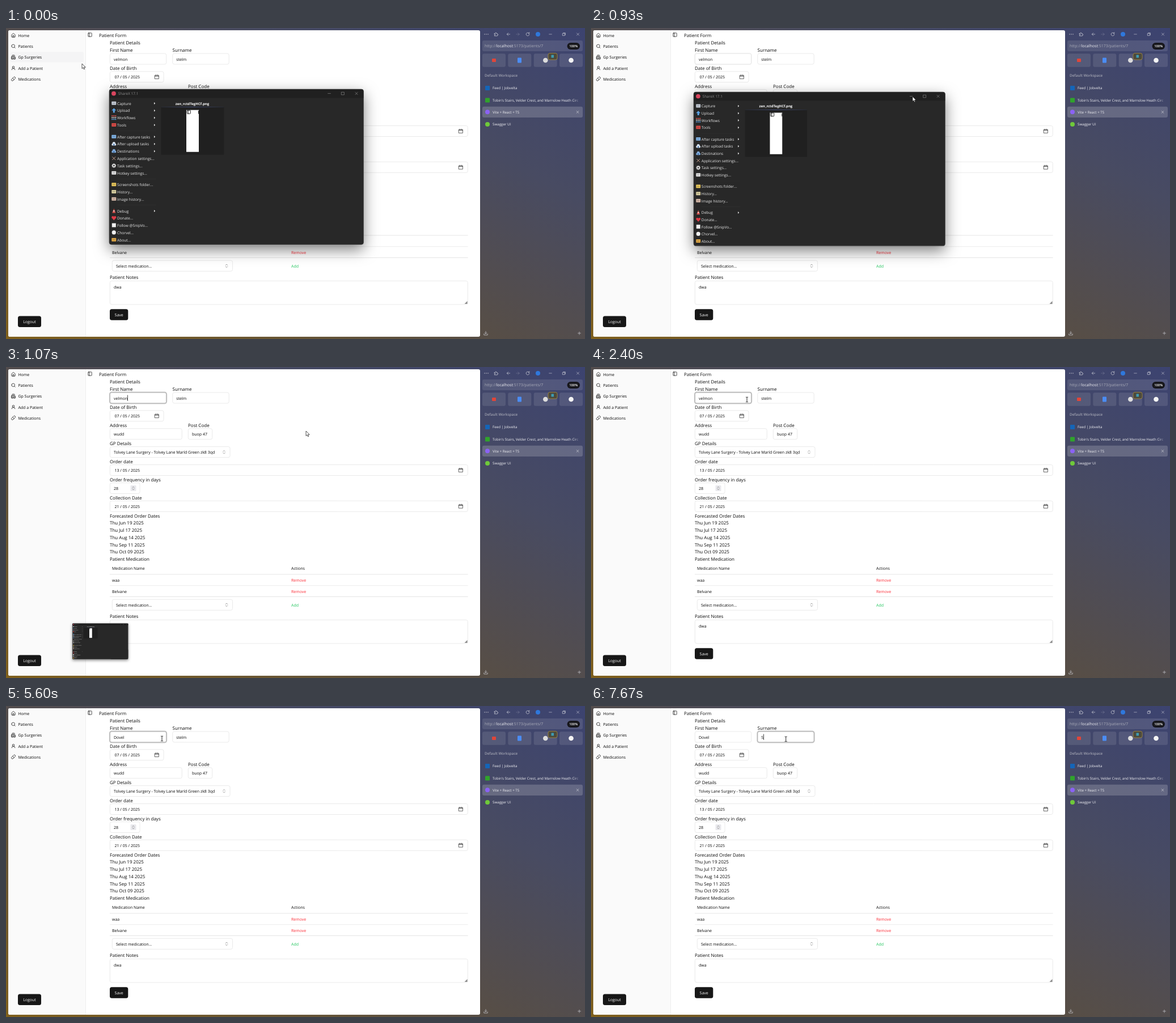
An HTML page with a canvas for the animation above (8 s loop, 1021x549 px).

```html
<!DOCTYPE html>
<html lang="en">
<head>
<meta charset="utf-8">
<title>Patient Form</title>
<style>
  html, body { margin: 0; width: 100%; height: 100%; overflow: hidden; }
  canvas { display: block; }
</style>
</head>
<body>
<canvas id="stage" width="1021" height="549"></canvas>
<script>
const W = 1021, H = 549, LOOP = 8000, STEP = 200 / 3;
const ctx = document.getElementById('stage').getContext('2d');
const INK = '#0a0a0a', BORDER = '#e5e5e5';
const OLD_NAME = 'velmon', NEW_NAME = 'Dovel', SURNAME = 'stelm';

const ICON = {
  house: 'M3 10a2 2 0 0 1 .7-1.5l7-6a2 2 0 0 1 2.6 0l7 6A2 2 0 0 1 21 10v9a2 2 0 0 1-2 2H5a2 2 0 0 1-2-2zM15 21v-8H9v8',
  search: 'M3 11a8 8 0 1 0 16 0a8 8 0 1 0-16 0M21 21l-4.3-4.3',
  hospital: 'M12 6v4M14 8h-4M14 14h-4M14 18h-4M18 12h2a2 2 0 0 1 2 2v6a2 2 0 0 1-2 2H4a2 2 0 0 1-2-2v-9a2 2 0 0 1 2-2h2M18 22V4a2 2 0 0 0-2-2H8a2 2 0 0 0-2 2v18',
  user: 'M7 8a5 5 0 1 0 10 0a5 5 0 1 0-10 0M20 21a8 8 0 0 0-16 0',
  pill: 'm10.5 20.5 10-10a4.95 4.95 0 1 0-7-7l-10 10a4.95 4.95 0 1 0 7 7ZM8.5 8.5l7 7',
  panel: 'M5 3h14a2 2 0 0 1 2 2v14a2 2 0 0 1-2 2H5a2 2 0 0 1-2-2V5a2 2 0 0 1 2-2zM9 3v18',
  chevrons: 'm7 15 5 5 5-5M7 9l5-5 5 5',
  calendar: 'M3 5h18v16H3zM3 9h18M8 2v4M16 2v4',
  puzzle: 'M4 8h5a3 3 0 1 1 5 0h5v4a3 3 0 1 1 0 5v4H4v-4a3 3 0 1 0 0-5z',
  back: 'M20 12H4M11 5l-7 7 7 7',
  forward: 'M4 12h16M13 5l7 7-7 7',
  reload: 'M20 12a8 8 0 1 1-3-6.2M20 3v5h-5',
  download: 'M12 3v11M7 10l5 5 5-5M3 15v6h18v-6',
  plus: 'M12 4v16M4 12h16',
  close: 'M5 5l14 14M19 5L5 19',
  minus: 'M4 12h16',
  restore: 'M5 8h11v11H5zM8 5h11v11',
  square: 'M4 4h16v16H4z'
};

function text(s, x, y, size = 7, color = INK, weight = 400, align = 'left') {
  ctx.font = `${weight} ${size}px "Open Sans", "Noto Sans", sans-serif`;
  ctx.textAlign = align;
  ctx.fillStyle = color;
  ctx.fillText(s, x, y + size * 0.36);
}
const label = (s, x, y) => text(s, x, y, 8);

function box(x0, y0, x1, y1, fill, r = 0, stroke, width = 0.8) {
  ctx.beginPath();
  ctx.roundRect(x0, y0, x1 - x0, y1 - y0, r);
  if (fill) { ctx.fillStyle = fill; ctx.fill(); }
  if (stroke) { ctx.strokeStyle = stroke; ctx.lineWidth = width; ctx.stroke(); }
}

function dot(x, y, r, color) {
  ctx.beginPath();
  ctx.arc(x, y, r, 0, 7);
  ctx.fillStyle = color;
  ctx.fill();
}

function icon(name, x, y, size = 8.5, color = INK, width = 2) {
  ctx.save();
  ctx.translate(x - size / 2, y - size / 2);
  ctx.scale(size / 24, size / 24);
  ctx.strokeStyle = color;
  ctx.lineWidth = width;
  ctx.lineCap = ctx.lineJoin = 'round';
  ctx.stroke(new Path2D(ICON[name]));
  ctx.restore();
}

function poly(points, fill) {
  ctx.beginPath();
  points.forEach(([x, y]) => ctx.lineTo(x, y));
  ctx.closePath();
  ctx.fillStyle = fill;
  ctx.fill();
}

const field = (x0, y0, x1, y1 = y0 + 19) => box(x0, y0, x1, y1, '#fff', 3, BORDER);

function dateField(value, y, right, iconX) {
  field(183.3, y, right);
  text(value, 191.5, y + 10);
  icon('calendar', iconX, y + 9.5, 9, '#333');
}

function backdrop() {
  // The gradient runs perpendicular to the other diagonal, like "to top right".
  const k = W * H / (W * W + H * H), dx = H * k, dy = W * k;
  const g = ctx.createLinearGradient(W / 2 - dx, H / 2 + dy, W / 2 + dx, H / 2 - dy);
  g.addColorStop(0, '#80601c');
  g.addColorStop(0.42, '#574e46');
  g.addColorStop(0.72, '#484b62');
  g.addColorStop(1, '#3c4370');
  ctx.fillStyle = g;
  ctx.fillRect(0, 0, W, H);
}

function sidebar(hover) {
  box(4, 4, 836, 545, '#fff', 3);
  box(4, 4, 140, 545, '#fafafa', [3, 0, 0, 3]);
  box(140, 4, 140.6, 545, BORDER);
  if (hover) box(8, 42, 137, 60.5, '#f4f4f5', 3);
  [['house', 'Home'], ['search', 'Patients'], ['hospital', 'Gp Surgeries'],
   ['user', 'Add a Patient'], ['pill', 'Medications']].forEach(([name, s], i) => {
    const y = 13.2 + i * 19.2;
    icon(name, 13, y - 0.2);
    text(s, 21.4, y + 0.2);
  });
  box(21, 508.6, 62, 528, '#171717', 3.5);
  text('Logout', 41.5, 518.7, 7, '#fafafa', 400, 'center');
}

function form() {
  icon('panel', 148, 12);
  label('Patient Form', 164, 12.8);
  label('Patient Details', 183, 26.6);
  label('First Name', 183, 39.4);
  label('Surname', 293.6, 39.4);
  field(183.3, 45, 282.7);
  field(293.8, 45, 393.2);
  label('Date of Birth', 183, 71.3);
  dateField('07 / 05 / 2025', 76.8, 278, 266);
  label('Address', 183, 103.2);
  label('Post Code', 321, 103.2);
  field(183.3, 108.7, 310.3);
  text('wudd', 190, 118.7);
  field(321.3, 108.7, 363.7);
  text('buop 47', 328, 118.7);
  label('GP Details', 183, 135.1);
  field(183.3, 140.6, 395);
  text('Tolvey Lane Surgery - Tolvey Lane Marld Green zk8 3qd', 190, 150.7);
  icon('chevrons', 384.5, 150.2, 8.5, '#777');
  label('Order date', 183, 167);
  dateField('13 / 05 / 2025', 172.5, 814.3, 802);
  label('Order frequency in days', 183, 199);
  field(183.3, 204.4, 236);
  text('28', 190, 214.4);
  box(219.5, 209, 229.5, 219, '#e9e9ed', 1);
  icon('chevrons', 224.5, 214, 8, '#666');
  label('Collection Date', 183, 230.8);
  dateField('21 / 05 / 2025', 236.3, 814.3, 802);
  label('Forecasted Order Dates', 183, 262.7);
  ['Jun 19', 'Jul 17', 'Aug 14', 'Sep 11', 'Oct 09'].forEach((d, i) =>
    label(`Thu ${d} 2025`, 183, 275.5 + i * 12.77));
  label('Patient Medication', 183, 339.3);

  text('Medication Name', 187, 355.8);
  text('Actions', 503, 355.8);
  [['waa', 376.5], ['Belvane', 396.2]].forEach(([s, y]) => {
    text(s, 187, y);
    text('Remove', 503, y, 7, '#fb2c36');
  });
  [366, 385.9, 405.5].forEach(y => box(183, y - 0.4, 814.5, y + 0.4, BORDER));
  field(187.3, 410.3, 399.5);
  text('Select medication...', 194, 420.3);
  icon('chevrons', 389, 419.9, 8.5, '#777');
  text('Add', 503, 420.2, 7, '#22c55e');
  label('Patient Notes', 183, 440.5);
  field(183.3, 446.5, 814.3, 488);
  text('dwa', 190, 457);
  poly([[813.5, 482], [813.5, 487], [808.5, 487]], '#8a8a8a');
  box(183, 496.3, 215.3, 515.7, '#171717', 3.5);
  text('Save', 199.2, 506.2, 7, '#fafafa', 400, 'center');
}

function browserPanel() {
  const pale = '#d4d5dc', glass = 'rgba(255,255,255,.1)';
  [-3, 0, 3].forEach(d => dot(847 + d, 11, 0.7, pale));
  icon('puzzle', 864, 11, 8, pale);
  icon('back', 886, 11, 8, pale);
  icon('forward', 902.5, 11, 8, 'rgba(255,255,255,.25)');
  icon('reload', 920, 11, 8.5, pale);
  dot(938, 11, 4, '#2f78dc');
  icon('minus', 960, 11, 7, pale);
  icon('restore', 984, 11, 8, pale);
  icon('close', 1008.5, 11, 7, pale);

  box(840, 22, 1017, 41, glass, 3);
  let x = 844;
  [['http://', 0], ['localhost', 1], [':5173/patients/7', 0]].forEach(([s, strong]) => {
    text(s, x, 31.8, 7, strong ? '#f2f2f5' : '#a9abb8');
    x += ctx.measureText(s).width;
  });
  box(989.5, 26, 1012, 38, '#17171c', 6);
  text('100%', 1000.7, 32, 5.8, '#fff', 600, 'center');

  [840, 885.3, 930.7, 976].forEach(bx => box(bx, 45.3, bx + 41, 68.7, glass, 3));
  box(857, 54, 864, 60, '#e0463a', 1);
  box(902, 52.5, 909, 61.5, '#4b8df5', 1);
  dot(951.3, 57, 4.3, '#dcdcdc');
  dot(996.5, 57, 4.3, '#f4f4f4');
  box(956, 44.5, 972, 56, '#4c4a3c', 3, '#b8963a', 0.7);
  box(961.5, 47.5, 966, 52.5, '#3d9bb4', 0.5);

  text('Default Workspace', 844, 83.3, 6.4, '#a2a4b2', 600);
  box(840, 138.7, 1017, 158, 'rgba(255,255,255,.18)', 3);
  box(845, 102, 853, 110, '#1465b8', 1);
  box(845, 123.5, 853, 131.5, '#30a32c', 1);
  dot(849, 148.3, 4, '#8b62f5');
  dot(849, 170, 4, '#6fc93a');
  const fade = ctx.createLinearGradient(1000, 0, 1014, 0);
  fade.addColorStop(0, '#f0f0f4');
  fade.addColorStop(1, 'rgba(240,240,244,0)');
  ['Feed | Jobvelta', "Tobin's Stairs, Velder Crest, and Marnslow Heath Circ",
   'Vite + React + TS', 'Swagger UI'].forEach((s, i) =>
    text(s, 858, 106.2 + i * 21.3, 6.2, i === 1 ? fade : '#f0f0f4', 500));
  icon('close', 1008, 148.4, 6.5, '#eee');
  icon('download', 846, 538.8, 8.5, pale);
  icon('plus', 1011, 538.8, 7.5, pale);
}

const MENU = [
  [133, 'Capture', '#c5ccd6', 'box', 1], [145.8, 'Upload', '#5ba3e6', 'up', 1],
  [158.5, 'Workflows', '#d9534f', 'grid', 1], [171.3, 'Tools', '#d94a45', 'box', 1],
  [192, 'After capture tasks', '#7fb2e5', 'box', 1], [204.8, 'After upload tasks', '#d8e2ee', 'cloud', 1],
  [217.6, 'Destinations', '#7fa9d8', 'cloud', 1], [230.4, 'Application settings...', '#c9a28f', 'cross'],
  [243.2, 'Task settings...', '#d8d8d8', 'gear'], [256, 'Hotkey settings...', '#e2e2e2', 'box'],
  [276.5, 'Screenshots folder...', '#e8c75a', 'box'], [289.3, 'History...', '#d9cfa0', 'box'],
  [302, 'Image history...', '#d5b8a8', 'box'],
  [323, 'Debug', '#d9534f', 'cone', 1], [335.7, 'Donate...', '#e03a45', 'heart'],
  [348.4, 'Follow @SnipVo...', '#f0f0f0', 'mark'], [361.2, 'Chorvel...', '#f0f0f0', 'dot'],
  [374, 'About...', '#e0a845', 'box']
];

function menuIcon(kind, x, y, c) {
  if (kind === 'box') {
    box(x - 4, y - 3, x + 4, y + 3, c, 0.7);
    box(x - 2.5, y - 0.6, x + 2.5, y + 0.6, 'rgba(40,40,50,.35)');
  } else if (kind === 'up') {
    poly([[x, y - 4], [x + 4, y], [x + 1.5, y], [x + 1.5, y + 4], [x - 1.5, y + 4], [x - 1.5, y], [x - 4, y]], c);
  } else if (kind === 'grid') {
    const rows = [c, '#c9c9c9', '#5b9bd5'];
    for (let i = 0; i < 9; i++) {
      const px = x + (i % 3 - 1) * 3, py = y + ((i / 3 | 0) - 1) * 3;
      box(px - 1, py - 1, px + 1, py + 1, rows[i / 3 | 0]);
    }
  } else if (kind === 'cloud') {
    dot(x, y - 1, 2.6, c);
    box(x - 4, y - 0.5, x + 4, y + 3, c, 1.5);
    box(x - 1, y, x + 1, y + 3, '#3f6fa8');
  } else if (kind === 'cross') {
    icon('close', x, y, 9, c, 2.6);
  } else if (kind === 'gear') {
    for (let a = 0; a < 8; a++) dot(x + 3 * Math.cos(a * Math.PI / 4), y + 3 * Math.sin(a * Math.PI / 4), 0.9, c);
    dot(x, y, 2.9, c);
    dot(x, y, 1.2, '#282828');
  } else if (kind === 'cone') {
    poly([[x, y - 4], [x + 3, y + 3.8], [x - 3, y + 3.8]], c);
    box(x - 1.4, y - 0.5, x + 1.4, y + 0.8, '#eee');
  } else if (kind === 'heart') {
    dot(x - 1.9, y - 1.2, 2.1, c);
    dot(x + 1.9, y - 1.2, 2.1, c);
    poly([[x - 3.8, y - 0.3], [x + 3.8, y - 0.3], [x, y + 4]], c);
  } else if (kind === 'mark') {
    box(x - 3.5, y - 3.5, x + 3.5, y + 3.5, c);
  } else {
    dot(x, y, 3.6, c);
  }
}

function captureWindow([x, y, w, h]) {
  const s = w / 448;
  ctx.save();
  ctx.translate(x, y);
  ctx.scale(s, h / 274);
  ctx.translate(-182, -108);
  ctx.shadowColor = 'rgba(0,0,0,.5)';
  ctx.shadowBlur = 26 * s;
  ctx.shadowOffsetY = 9 * s;
  box(182, 108, 630.5, 382.3, '#282828', 4);
  ctx.shadowColor = 'transparent';
  box(182, 108, 630.5, 123.5, '#202020', [4, 4, 0, 0]);
  box(182, 108, 630.5, 382.3, null, 4, '#454545', 0.6);
  dot(190, 115.6, 3.9, '#d9455f');
  text('ShareX 17.1', 197.8, 115.8, 6.5, '#8d8d8d');
  icon('minus', 570, 115.6, 7, '#999');
  icon('square', 594, 115.6, 7, '#999');
  icon('close', 618, 115.6, 7, '#999');
  MENU.forEach(([my, s, color, kind, arrow]) => {
    menuIcon(kind, 190.3, my - 0.3, color);
    text(s, 196, my + 0.2, 6.65, '#e8e8e8');
    if (arrow) poly([[261, my - 2], [263.2, my], [261, my + 2]], '#e8e8e8');
  });
  [181.5, 266.3, 312.5].forEach(sy => box(196, sy, 265, sy + 0.5, '#323232'));

  text('zen_rctdTegHCf.png', 328.5, 133.4, 6.1, '#fff', 700, 'center');
  box(273.7, 139.5, 384.3, 223.7, '#202020');
  const line = ctx.createLinearGradient(274, 0, 384, 0);
  line.addColorStop(0, '#282c38');
  line.addColorStop(0.5, '#4a5890');
  line.addColorStop(1, '#282c38');
  box(273.7, 139.3, 384.3, 140.1, line);
  box(318, 144.8, 340, 218.8, '#fff');
  icon('panel', 322.3, 148.3, 8, '#111', 2.6);
  box(339, 146, 340, 151.5, '#222');
  ctx.restore();
}

const smooth = p => p * p * (3 - 2 * p);
const clamp = p => Math.min(1, Math.max(0, p));

// Rows are [time, ...values]; values run linearly between rows.
function track(rows, t, ease = p => p) {
  const i = rows.findIndex(r => r[0] > t);
  if (i < 0) return rows[rows.length - 1].slice(1);
  if (i === 0) return rows[0].slice(1);
  const a = rows[i - 1], b = rows[i], p = ease((t - a[0]) / (b[0] - a[0]));
  return a.slice(1).map((v, j) => v + (b[j + 1] - v) * p);
}

const at = step => step * STEP;
const WINDOW_PATH = [
  [at(13), 182, 108, 448, 274], [at(14), 181, 113, 443, 271.3],
  [at(15), 164.7, 202.7, 352, 215.2], [at(16), 117.2, 452.7, 98, 63]
];
const POINTER_START = [[0, 134, 63], [at(13), 567, 121]];
const POINTER_PATH = [
  [at(14), 567, 121], [at(15), 557, 117], [at(16), 529, 113], [at(21), 390, 83],
  [at(26), 263.5, 51.5], [at(31), 275, 57.5], [at(93), 275, 57.5], [at(98), 306, 73.5], [at(104), 343.7, 58.3]
];
const KEY_TIMES = [4270, 4470, 4730, 4870, 5070];
const CLEARED = 3200, SURNAME_CLICK = 6800, SELECTED = 7330, RETYPED = 7670;
const CARET_RESETS = [1870, CLEARED, ...KEY_TIMES, SURNAME_CLICK, RETYPED];

function focusRing(x0, x1, p) {
  if (p <= 0) return;
  ctx.globalAlpha = p;
  box(x0 - 0.7, 44.3, x1 + 0.7, 64.7, null, 3.8, '#d0d0d0', 1.7);
  box(x0, 45, x1, 64, null, 3, '#a1a1a1', 0.8);
  ctx.globalAlpha = 1;
}

function caretShown(t) {
  if (t < 1000 || (t >= SELECTED && t < RETYPED)) return false;
  const last = CARET_RESETS.filter(r => r <= t).pop();
  return last === undefined || Math.floor((t - last) / 530) % 2 === 0;
}

function names(t) {
  const typed = KEY_TIMES.filter(k => k <= t).length;
  const first = t < CLEARED ? OLD_NAME : NEW_NAME.slice(0, typed);
  const last = t < RETYPED ? SURNAME : 'S';
  const moved = clamp((t - SURNAME_CLICK) / 150);
  focusRing(183.3, 282.7, clamp((t - 925) / 150) * (1 - moved));
  focusRing(293.8, 393.2, moved);
  text(first, 190, 55);
  const firstEnd = 190 + ctx.measureText(first).width;
  const selected = t >= SELECTED && t < RETYPED;
  const lastWidth = ctx.measureText(last).width;
  if (selected) box(300.3, 49, 300.3 + lastWidth, 60, '#0078d7');
  text(last, 300.3, 55, 7, selected ? '#fff' : INK);
  if (caretShown(t)) {
    const x = t < SURNAME_CLICK ? firstEnd : 300.3 + lastWidth;
    box(x, 49.5, x + 0.7, 60, '#000');
  }
}

function pointer(t, time) {
  const [x, y] = t < 930 ? track(POINTER_START, time, smooth) : track(POINTER_PATH, time);
  const inField = y > 45 && y < 64 && ((x > 183 && x < 283) || (x > 294 && x < 393));
  ctx.save();
  ctx.translate(x, y);
  if (t > 930 && inField) {
    ctx.strokeStyle = '#111';
    ctx.lineWidth = 0.9;
    ctx.stroke(new Path2D('M-2 -4.3H-.5L0 -3.8L.5 -4.3H2M0 -3.8V3.8M-2 4.3H-.5L0 3.8L.5 4.3H2'));
  } else {
    const arrow = new Path2D('M0 0V8.6L2 6.8L3.4 9.9L4.8 9.3L3.5 6.3H6.2Z');
    ctx.fillStyle = '#fff';
    ctx.fill(arrow);
    ctx.strokeStyle = '#111';
    ctx.lineWidth = 0.7;
    ctx.lineJoin = 'round';
    ctx.stroke(arrow);
  }
  ctx.restore();
}

// Motion is sampled on the step; switches allow for times rounded up to 10 ms.
function draw(step) {
  const time = at(step), t = time + 5;
  ctx.textRendering = 'geometricPrecision';
  backdrop();
  sidebar(t < 930);
  form();
  names(t);
  browserPanel();
  if (t < 1130) captureWindow(track(WINDOW_PATH, time));
  pointer(t, time);
}

let shown = -1;
const start = performance.now();
function tick() {
  const t = (performance.now() - start) % LOOP;
  const step = Math.floor((t + 4) / STEP) % (LOOP / STEP);
  if (step !== shown) {
    shown = step;
    draw(step);
  }
  requestAnimationFrame(tick);
}
tick();
</script>
</body>
</html>
```
